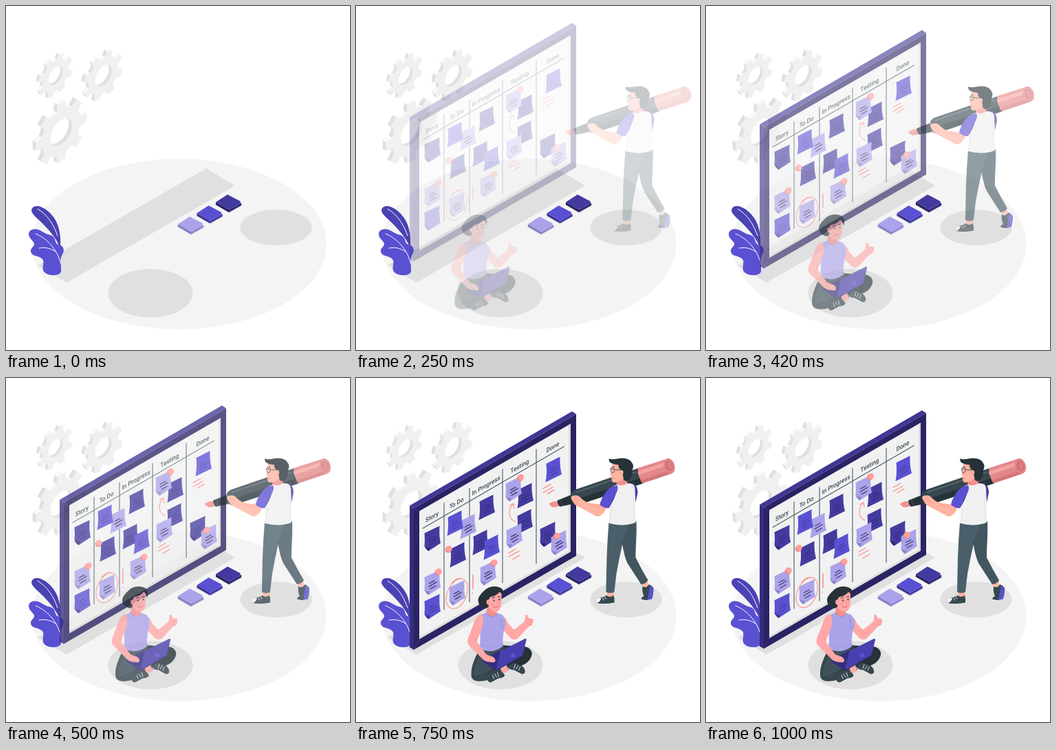
Recreate the animation shown at these times as an HTML page with a canvas. Size 500 by 500 pixels, loop 1040 ms.

```html
<!DOCTYPE html>
<html lang="en">
<head>
<meta charset="utf-8">
<title>Planning board</title>
<style>
html, body { margin: 0; width: 100%; height: 100%; overflow: hidden; background: #fff; }
canvas { display: block; width: 100vw; height: 100vh; }
</style>
</head>
<body>
<canvas id="stage"></canvas>
<script>
const SIZE = 500, LOOP = 1040, STEP = 1000 / 24;
const DPR = Math.max(1, window.devicePixelRatio || 1);
const INK = '#263238', SLATE = '#37474f', STEEL = '#455a64';
const SKIN = '#ffa8a7', PEACH = '#ffb3a0', BLUSH = '#f28f8f', RED = '#ff8f8d';
const MID = '#5a50d2', DEEP = '#433a9f', PALE = '#aba3ea';

function prepare(cv) {
  cv.width = cv.height = SIZE * DPR;
  return cv.getContext('2d');
}
const stage = document.getElementById('stage');
const main = prepare(stage);
const scratch = document.createElement('canvas');
const layer = prepare(scratch);
let g = main;

function fill(d, color) {
  g.fillStyle = color;
  g.fill(new Path2D(d));
}
function line(d, color, width = 1) {
  g.strokeStyle = color;
  g.lineWidth = width;
  g.lineCap = g.lineJoin = 'round';
  g.stroke(new Path2D(d));
}
function oval(x, y, rx, ry, color, turn = 0) {
  g.fillStyle = color;
  g.beginPath();
  g.ellipse(x, y, rx, ry, turn, 0, 7);
  g.fill();
}
function at(x, y, draw) {
  g.save();
  g.translate(x, y);
  draw();
  g.restore();
}
function poly(points, color) {
  g.fillStyle = color;
  g.beginPath();
  points.forEach(([x, y]) => g.lineTo(x, y));
  g.closePath();
  g.fill();
}

// Point on the upright isometric plane that the board and gears share.
function iso(x, y, r, a) {
  const u = r * Math.cos(a), v = r * Math.sin(a);
  return [x + u * 0.866, y - u * 0.5 + v];
}
function ring(x, y, r) {
  return Array.from({ length: 48 }, (_, i) => iso(x, y, r, i * Math.PI / 24));
}
function gear(x, y, r, hole, depth, turn) {
  const rim = [];
  for (let i = 0; i < 8; i++) {
    const a = turn + i * Math.PI / 4;
    rim.push([a - 0.23, 0.77], [a - 0.15, 1], [a + 0.15, 1], [a + 0.23, 0.77], [a + 0.39, 0.75]);
  }
  const pts = rim.map(([a, k]) => iso(x, y, r * k, a));
  const ex = -depth, ey = -depth * 0.577;
  pts.forEach((p, i) => {
    const q = pts[(i + 1) % pts.length];
    const nx = q[1] - p[1], ny = p[0] - q[0];
    if (nx * ex + ny * ey <= 0) return;
    const top = ny < 0 && Math.abs(ny) > Math.abs(nx) * 0.7;
    poly([p, q, [q[0] + ex, q[1] + ey], [p[0] + ex, p[1] + ey]], top ? '#fafafa' : '#e0e0e0');
  });
  poly(pts, '#f0f0f0');
  const inner = ring(x, y, hole);
  poly(inner, '#e0e0e0');
  g.save();
  g.beginPath();
  inner.forEach(p => g.lineTo(...p));
  g.clip();
  poly(ring(x + ex, y + ey, hole), '#fff');
  g.restore();
}

function pad(x, y, top, left, right) {
  at(x, y, () => {
    fill('M-21 2L0-10L22 3L1 15Z', '#e4e4e4');
    fill('M-18-1L1 10V14L-18 3Z', left);
    fill('M1 10L19 0V4L1 14Z', right);
    fill('M-18-1L-1-12L18-2L17 0L19 0L1 10Z', top);
    line('M1 12L19 2', left, 0.6);
  });
}

function ground() {
  gear(72, 101.5, 29, 12, 3.6, 0.34);
  gear(141.5, 101.3, 33, 14, 4.2, 0.34);
  gear(80.5, 183, 43, 18, 5, 0);
  oval(251.5, 346, 214, 124, '#f4f4f4');
  fill('M46 377L291 236L333 261L88 402Z', '#e0e0e0');
  oval(392.5, 322, 52, 26, '#e0e0e0');
  oval(210, 417.3, 61.5, 35.3, '#e0e0e0');

  fill('M77 348C72 336 62 325 52 315C44 307 34 300 38 294C43 287 56 292 66 303C77 315 80 332 79 349Z', '#4b42b3');
  line('M46 295C60 303 69 317 75 334', '#fff');
  fill('M33 331C34 323 45 322 53 328C59 332 63 332 67 334C73 337 70 346 77 347C83 348 86 354 82 361C77 368 81 377 80 386' +
    'C78 393 60 393 55 386C51 380 57 373 53 368C48 362 38 365 36 357C35 351 42 350 41 345C39 340 33 338 33 331Z', MID);
  line('M43 331C58 337 74 352 79.5 374M48 352C56 350 65 352 72 357', '#fff');

  pad(268, 318, PALE, '#8880c4', '#978ed8');
  pad(295.5, 302, MID, '#3c358f', '#4a41b2');
  pad(323, 286, '#433a9f', '#28225f', '#352d80');
}

const TONES = {
  dark: ['#443ba0', '#2e276f', '#2b2468'],
  mid: [MID, '#3e3692', '#3c348e'],
  pale: [PALE, '#8b83c8', '#423d6b']
};
function note(x, y, tone, curled) {
  const [face, curl, ink] = TONES[tone];
  at(x, y, () => {
    if (curled) {
      fill('M-11.5-9L10.5-19.5Q9.5-4 12 5.5L-5.5 17Q-9 15-11.5 10Q-10.5 1-11.5-9Z', face);
      fill('M-5.5 17Q-9 15-11.5 10Q-7 12.5-3 11Z', curl);
    } else {
      fill('M-10.5-9L9.5-19Q9-4 12 6.5L-11.5 18Q-9 5-10.5-9Z', face);
    }
    line('M-4.5 0L3-4M-5 4.5L6-2M-3 8L5 3.5', ink, tone === 'pale' ? 1.3 : 0.9);
  });
}
function pin(x, y) {
  oval(x - 1, y + 1, 4.4, 4.6, '#ee8a88');
  oval(x + 0.4, y - 0.4, 4.2, 4.4, '#ff9f9c');
}
function label(text, x, y) {
  g.save();
  g.transform(0.866, -0.5, 0, 1, x, y);
  g.font = '500 9.3px Roboto, "Liberation Sans", sans-serif';
  g.textAlign = 'center';
  g.textBaseline = 'middle';
  g.fillStyle = SLATE;
  g.fillText(text, 0, 0);
  g.restore();
}

function board() {
  fill('M78 184L84 188V393.5L78 390Z', '#352d7d');
  fill('M78 184L314 47L320 51L84 188Z', '#3f3794');
  fill('M84 188L320 51V257L84 393.5Z', '#2a2364');
  fill('M92 192L312 65V251L92 378Z', '#f1f1f1');
  fill('M309 67L312 65V251L309 249Z', '#dcdcdc');
  fill('M92 375L309 249.5L312 251L92 378Z', '#dcdcdc');
  line('M84 188L92 192M84 393L92 378', '#4a42a0', 0.6);

  line('M97 217L302.5 98M128 180V335M165 159V324M213 131V296M262 102V268', STEEL, 1.1);
  label('Story', 110.5, 200.5);
  label('To Do', 146, 180.5);
  label('In Progress', 189, 155);
  label('Testing', 238, 127);
  label('Done', 286, 99);

  const curled = {
    dark: [[111, 233], [279, 227]],
    mid: [[111, 332]],
    pale: [[111, 297], [147, 312], [192, 283], [230, 229], [295, 239]]
  };
  const flat = {
    dark: [[148, 256], [190, 187], [181, 238], [246, 170], [245, 208]],
    mid: [[144, 210], [197, 245], [287, 132]],
    pale: []
  };
  note(163, 215, 'pale');
  for (const tone in curled) {
    curled[tone].forEach(([x, y]) => note(x, y, tone, true));
    flat[tone].forEach(([x, y]) => note(x, y, tone));
  }
  note(229, 161, 'pale', true);
  [[120, 280], [135, 247], [201, 267], [239.5, 143], [292, 228]].forEach(p => pin(...p));

  line('M155 290C143 289 131 305 131 320C131 335 143 337 152 329C162 320 166 300 158 292C153 287 144 290 139 297', RED, 1.1);
  line('M170 285V305M169.5 311V311.5', RED, 1.6);
  line('M231 207C222 203 220 191 228 182M223 184L229 181L230 188', RED, 1.1);
  line('M272 159L283 153M272 165L286 157M278 167L288 161', RED, 1.3);
  line('M222 253L232 247M222 258L237 250M228 262L238 256', RED, 1.3);
}

function marker() {
  fill('M282 183Q287 179 293 179L298 186L290 188Q285 188 282 183Z', BLUSH);
  fill('M294 178L314 170L317 183L298 187Q294 183 294 178Z', INK);
  line('M299 177Q299 182 302 186', '#4b5a62', 0.8);
  fill('M314 168Q316 164 321 162L412 131L419 153L326 184Q318 187 316 180Z', SLATE);
  fill('M316 178L417 145L419 153L326 184Q319 187 316 178Z', INK);
  line('M322 166L408 137', '#53646c', 2);
  fill('M411 131L455 117C462 117 467 134 460 139L418 153Q411 143 411 131Z', '#e48788');
  fill('M411 136L452 122L454 127L412 141Z', '#f4a3a2');
  fill('M415 149L458 134L460 139L418 153Z', '#d37678');
  oval(457, 128, 7.8, 11.3, '#e08385', -0.3);
  oval(457, 128, 5, 7.5, '#c96c70', -0.3);
  oval(457.6, 128, 3.7, 6, '#dc7d80', -0.3);
}

function man() {
  fill('M416 291L425 291L426 302L418 304Z', PEACH);
  fill('M366 308H377L376 320L367 321Z', PEACH);
  fill('M418 303Q424 306 427 300Q431 301 434 305Q434 316 431 323Q424 325 416 322Q416 319 420 317Q417 310 418 303Z', SLATE);
  fill('M429 302Q434 304 434 309L431 323L425 323Q427 312 429 302Z', MID);
  line('M416 322Q424 325 431 322', '#fff', 1.2);
  fill('M350 323Q353 319 359 319L366 316Q370 320 376 316Q378 321 377 327Q364 330 353 328Q350 327 350 323Z', SLATE);
  fill('M350 323Q353 318 358 320Q357 325 352 327Q350 326 350 323Z', '#f5f5f5');
  line('M351 327.5Q362 330 377 327', '#e9e9e9', 1);
  line('M360 320L362 323M363 318L365 321', '#fff', 0.9);

  fill('M385 211L409 208C410 225 408 245 408 261Q416 277 426 294Q423 299 416 300L396 269Q391 258 388 238Z', '#425660');
  fill('M369 210L398 211C396 222 392 231 389 241Q384 262 380 285L377 311Q371 314 365 311L366 262Q367 235 369 210Z', '#4a5f69');
  line('M388 241Q391 232 396 227', SLATE, 1);

  marker();

  fill('M381 143L394 142L396 154Q389 159 380 156Z', BLUSH);
  fill('M403 152Q411 155 411 167L408 181L404 180Z', DEEP);
  fill('M370 163Q373 157 381 155Q389 158 396 153Q406 152 407 160Q409 185 408 210Q390 217 369 211Q371 190 370 163Z', '#f0f0f0');
  line('M373 187Q373 198 370 208M406 165Q404 184 406 202', '#dedede', 0.8);

  fill('M318 171Q324 169 328 174Q335 181 343 182L360 184L369 180L363 194Q358 202 351 201L325 187Q318 184 317 179Z', PEACH);
  fill('M314 173Q317 169 321 172L327 180Q326 186 321 183Q315 180 314 173Z', PEACH);
  line('M318 176L324 182M321 174L326 180', BLUSH, 0.8);
  line('M340 183Q349 188 358 187', '#f59a99', 0.7);
  fill('M381 156Q372 157 366 164Q358 174 356 184Q362 190 369 189Q376 179 379 169Q384 160 381 156Z', MID);
  line('M378 170Q374 181 369 188', DEEP, 0.9);

  fill('M374 125Q372 132 373 135L370.5 140L373 142Q372 150 376 152Q385 152 391 145L392 126Q384 121 374 125Z', PEACH);
  fill('M369 117C373 119 378 118 383 117C392 115 401 118 403 124C405 126 405 130 403 134C404 142 400 149 394 150' +
    'C391 149 390 147 390 143L387 134Q383 132 383 126Q375 126 370 122Z', INK);
  oval(387, 138, 3.1, 4.2, PEACH, 0.2);
  line('M386 136Q388 138 387 140', BLUSH, 0.8);
  line('M371.5 132H377Q378 137 374 138Q372 137 371.5 132M377 133L386 134', SLATE, 0.9);
  line('M373 130L377 129.5', INK, 0.9);
  line('M373.5 146L376.5 146', '#d96a6c', 0.8);
}

function shoe(x, y, k) {
  at(x, y, () => {
    g.scale(k, 1);
    fill('M-12 8Q-13 1-7-3L4-7Q10-7 13 0Q11 4 4 4L-7 10Q-11 11-12 8Z', SLATE);
    line('M-12 8Q-10 11-6 9.5L4 4Q10 4 13 0', '#f3f3f3', 1.1);
    line('M-2-3L1 2M2-5L4 1M-5-1L-3 4', '#eee', 0.9);
  });
}

function woman() {
  fill('M206 388L232 390C243 389 252 391 254 399C255 405 250 414 239 418L218 424L196 420Z', INK);
  fill('M181 390C172 403 165 420 166 432C166 442 179 442 190 439L214 428L222 410L212 387Z', SLATE);
  fill('M183 396C176 408 169 421 170 432Q180 440 192 427L212 407L210 393Z', '#3f525c');
  line('M174 434Q190 430 203 420', INK, 1);
  fill('M208 421L217 417L220 426L211 430Z', SKIN);
  shoe(202, 433, 1);
  shoe(232, 421, -1);

  // raised arm with thumb up
  fill('M209 345Q216 347 219 356L228 366L242 355L250 361L233 379Q228 382 223 378L210 364Z', SKIN);
  fill('M242 355Q245 352 244 345Q247 342 249 347V350Q256 348 256 353Q256 360 250 361Q244 362 242 355Z', SKIN);
  line('M249 350L255 351M249 354H255.5M248 357.5L254 358', BLUSH, 0.8);
  line('M228 366Q227 369 225 371', BLUSH, 0.8);

  fill('M190 332L202 334L204 345Q196 354 187 343Z', BLUSH);
  fill('M181 344L188 341Q195 353 205 342L211 344Q218 352 215 363Q211 372 212 390Q197 402 178 394Q180 378 178 363Q176 350 181 344Z', PALE);
  line('M188 341Q195 353 205 342M181 350Q184 359 180 368M210 349Q208 357 212 364', '#8f86d2', 0.8);
  line('M181 388Q196 394 211 386', '#978ed8', 0.7);

  fill('M181 411L207 396L217 405L202 426Z', '#352d80');
  fill('M202 425L208 398Q209 396 212 395L244 379Q246 378 246 381L241 401Q240 404 238 405Z', '#4840ae');
  line('M202 425L239 404.5', '#2b2468', 1);
  oval(227, 403, 3.2, 3.2, MID);

  fill('M181 343Q174 344 171 353L161 379Q159 386 164 390L184 410Q191 414 200 413Q203 409 197 405L188 402L174 383L182 363Q185 350 181 343Z', SKIN);
  line('M191 411L196 413M188 402L194 405M174 382Q172 380 172 377', BLUSH, 0.9);

  // head
  fill('M189 312Q187 323 190 331Q195 340 201 340Q209 339 210 328L210 311Q199 305 189 312Z', SKIN);
  fill('M176 323C176 317 181 313 186 308C191 303 200 302 206 304C212 305 215 312 212 320Q211 313 207 311Q202 317 194 318' +
    'Q190 321 192 327L191 332Q188 337 183 333C179 332 176 328 176 323Z', INK);
  oval(191, 326, 2.9, 3.8, SKIN, -0.2);
  line('M190 325Q192 326 191.5 328', BLUSH, 0.8);
  oval(199, 323.5, 0.9, 1.2, INK);
  oval(206.5, 322, 0.9, 1.2, INK);
  line('M196 320L200 318.5M204.5 318L208 318', INK, 0.9);
  line('M203.5 324L205 328L202.5 328.5', BLUSH, 0.9);
  line('M198 332Q202 335 206 331', '#d96065', 1);
  oval(197, 329, 2, 1.4, '#fb9897');
}

// cubic-bezier(.36, -.01, .5, 1.38): settles after a small overshoot
function ease(t) {
  if (t <= 0) return 0;
  if (t >= 1) return 1;
  const curve = (s, a, b) => 3 * (1 - s) * (1 - s) * s * a + 3 * (1 - s) * s * s * b + s * s * s;
  let lo = 0, hi = 1;
  for (let i = 0; i < 24; i++) {
    const s = (lo + hi) / 2;
    if (curve(s, 0.36, 0.5) < t) lo = s; else hi = s;
  }
  return curve(lo, -0.01, 1.38);
}

function slide(draw, dx, dy, p) {
  g = layer;
  g.setTransform(1, 0, 0, 1, 0, 0);
  g.clearRect(0, 0, scratch.width, scratch.height);
  const rest = 30 * (1 - p);
  g.setTransform(DPR, 0, 0, DPR, dx * rest * DPR, dy * rest * DPR);
  draw();
  main.globalAlpha = Math.max(0, Math.min(1, p));
  main.drawImage(scratch, 0, 0, SIZE, SIZE);
  main.globalAlpha = 1;
}

function render(step) {
  g = main;
  g.setTransform(DPR, 0, 0, DPR, 0, 0);
  g.fillStyle = '#fff';
  g.fillRect(0, 0, SIZE, SIZE);
  ground();
  if (step < 2) return;
  const p = ease((step * STEP + 14) / 1000);
  slide(board, 0, -1, p);
  slide(man, 1, 0, p);
  slide(woman, -1, 0, p);
}

const start = performance.now();
let shown = -1;
function tick() {
  const t = (performance.now() - start) % LOOP;
  const step = Math.min(24, Math.floor((t + 6) / STEP));
  if (step !== shown) render(shown = step);
  requestAnimationFrame(tick);
}
tick();
</script>
</body>
</html>
```
